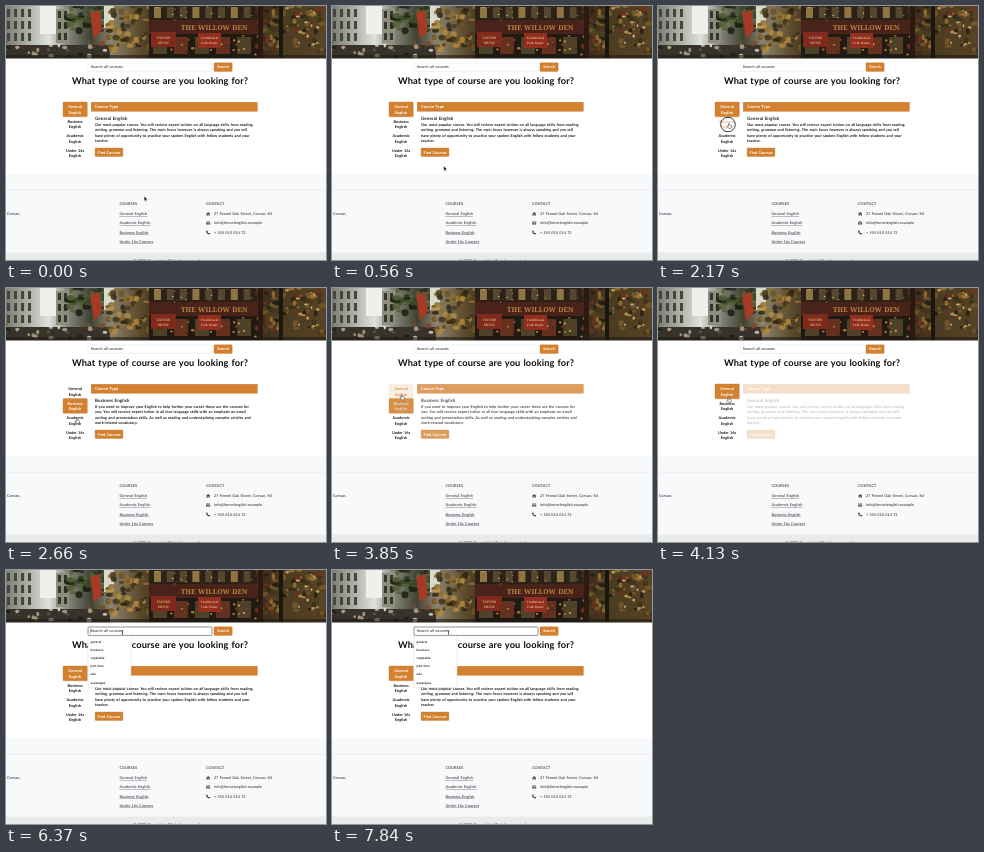
Animation of 320x254 px, one loop 8 s. Source, as an HTML page:

```html
<!DOCTYPE html>
<html lang="en">
<head>
<meta charset="utf-8">
<title>Course finder</title>
<style>
  html, body { margin: 0; width: 100%; height: 100%; overflow: hidden; background: #fff; }
  svg { display: block; width: 100vw; height: 100vh; }
  text {
    font-family: Lato, "Open Sans", sans-serif; font-weight: 700;
    letter-spacing: .013em; word-spacing: .07em; text-rendering: geometricPrecision;
  }
  .menu text { font-family: Roboto, Inter, sans-serif; font-weight: 500; }
  .sign text { font-family: "Noto Serif", serif; font-weight: 600; }
</style>
</head>
<body>
<svg id="stage" viewBox="0 0 320 254">
  <defs>
    <linearGradient id="street">
      <stop offset="0" stop-color="#75766a"/>
      <stop offset=".07" stop-color="#a9aba2"/>
      <stop offset=".14" stop-color="#dfe2dc"/>
      <stop offset=".2" stop-color="#85867a"/>
      <stop offset=".27" stop-color="#3f4231"/>
      <stop offset=".33" stop-color="#8c8370"/>
      <stop offset=".42" stop-color="#5b4a2b"/>
      <stop offset=".5" stop-color="#33271b"/>
      <stop offset=".76" stop-color="#382319"/>
      <stop offset=".86" stop-color="#4a3b21"/>
      <stop offset="1" stop-color="#594426"/>
    </linearGradient>
    <filter id="soft"><feGaussianBlur stdDeviation=".55"/></filter>
    <clipPath id="photoClip"><rect width="320" height="52.5"/></clipPath>
  </defs>
</svg>
<script>
const LOOP = 8000, STEP = 70;
const ORANGE = '#d4812f', BLACK = [20, 20, 20], AMBER = [212, 129, 47], WHITE = [255, 255, 255];
const stage = document.getElementById('stage');

function add(parent, tag, attrs = {}, content) {
  const node = document.createElementNS('http://www.w3.org/2000/svg', tag);
  for (const key in attrs) node.setAttribute(key, attrs[key]);
  if (content) node.textContent = content;
  return parent.appendChild(node);
}
const group = (parent, attrs) => add(parent, 'g', attrs);
const rect = (parent, x, y, width, height, fill, more) =>
  add(parent, 'rect', { x, y, width, height, fill, ...more });
const block = (parent, x, y, width, height, more) =>
  rect(parent, x, y, width, height, ORANGE, { stroke: '#bd7330', 'stroke-width': .35, ...more });
const label = (parent, x, y, size, content, fill = '#161616', more) =>
  add(parent, 'text', { x, y, 'font-size': size, fill, ...more }, content);
const middle = { 'text-anchor': 'middle' };

// Street photograph in broad tones
let seed = 11;
const random = () => (seed = (seed * 16807) % 2147483647) / 2147483647;
function scatter(parent, count, x, y, w, h, size, colours) {
  for (let i = 0; i < count; i++) {
    add(parent, 'ellipse', {
      cx: x + random() * w, cy: y + random() * h,
      rx: size * (.5 + random()), ry: size * (.4 + random() * .8),
      fill: colours[Math.floor(random() * colours.length)], opacity: .85
    });
  }
}
function drawPhoto() {
  const outer = group(stage, { 'clip-path': 'url(#photoClip)' });
  const photo = group(outer, { filter: 'url(#soft)' });
  rect(photo, -3, -3, 326, 59, 'url(#street)');

  // Left side: pale facades, sky and a tree
  for (let i = 0; i < 12; i++) rect(photo, 1 + i % 4 * 7, 3 + Math.floor(i / 4) * 12, 3, 8, '#44463d');
  rect(photo, 34, -2, 16, 30, '#eef0ec');
  rect(photo, 50, 3, 13, 34, '#8f8d7e');
  for (let i = 0; i < 6; i++) rect(photo, 52 + i % 2 * 6, 5 + Math.floor(i / 2) * 11, 3, 7, '#35372d');
  rect(photo, 0, 39, 104, 15, '#37332a');
  scatter(photo, 26, 0, 36, 104, 15, 2, ['#1b1b16', '#5f5747', '#b3a68c', '#7c4a2c', '#dcd7c8']);
  scatter(photo, 44, 60, -1, 40, 26, 3, ['#252e1b', '#3d4928', '#566037', '#191f13']);
  add(photo, 'path', { d: 'M84 7l9-3 3 20-8 9z', fill: '#a53a25' });
  rect(photo, 98, 0, 10, 22, '#d9d9cc');
  scatter(photo, 70, 101, 0, 42, 44, 2.8, ['#2e2715', '#6b5425', '#8f702f', '#47391c', '#b18a42']);

  // Pub front
  rect(photo, 143, 0, 108, 14, '#2b2117');
  for (let i = 0; i < 8; i++) rect(photo, 148 + i * 12.8, 1, 7, 11, i % 3 ? '#55472f' : '#8f7544');
  rect(photo, 143, 14, 110, 14, '#49231a');
  rect(photo, 143, 28, 110, 26, '#211a13');
  for (let i = 0; i < 5; i++) rect(photo, 147 + i * 21, 31, 14, 17, i % 2 ? '#65311f' : '#4d4128');
  scatter(photo, 34, 146, 29, 104, 20, 1.2, ['#c8853a', '#8b3821', '#d9a555', '#2a2219']);
  rect(photo, 145, 26, 25, 15, '#7f2a1c');
  rect(photo, 192, 27, 23, 15, '#932f20');
  scatter(photo, 22, 145, 0, 106, 14, .7, ['#e9bf70', '#c49048']);

  // Right side: trunk and golden leaves
  scatter(photo, 95, 250, -1, 70, 46, 2.9, ['#251e12', '#4c4020', '#75592a', '#9a7434', '#38331b', '#6d3320']);
  rect(photo, 252, 0, 5, 54, '#2c1a12');
  rect(photo, 273, 0, 4, 54, '#1a1710');
  scatter(photo, 20, 280, 2, 40, 42, 1.4, ['#c6a25c', '#a05c30', '#d8c48f']);
  rect(photo, 0, 49, 320, 5, '#211b14', { opacity: .6 });

  const sign = group(outer, { class: 'sign' });
  label(sign, 175, 24.3, 6.8, 'THE WILLOW DEN', '#bd8640');
  label(sign, 157.5, 32.5, 3.3, 'TAVERN', '#d9ad76', middle);
  label(sign, 157.5, 37.5, 3.3, 'MUSIC', '#d9ad76', middle);
  label(sign, 203.5, 33, 3, 'Traditional', '#dfb27c', middle);
  label(sign, 203.5, 37.5, 3, 'Folk Music', '#dfb27c', middle);
}
drawPhoto();

// Page
const field = rect(stage, 82, 57, 124, 8.4, '#fff', { rx: .8 });
label(stage, 84.7, 62.2, 3.9, 'Search all courses', '#555');
block(stage, 208, 56.8, 18.2, 8.6, { rx: .8 });
label(stage, 217.2, 62.3, 3.8, 'Search', '#fff', middle);
label(stage, 66, 77.5, 9.22, 'What type of course are you looking for?', '#0c0c0c');

const tabs = ['General', 'Business', 'Academic', 'Under 16s'].map((name, i) => {
  const y = 96 + i * 14.5;
  return {
    box: block(stage, 57, y, 24.3, 14.8, { rx: .8, opacity: 0 }),
    lines: [name, 'English'].map((word, n) => label(stage, 69.1, y + 6.1 + n * 5.4, 3.85, word, '#161616', middle))
  };
});

function coursePanel(title, lines) {
  const panel = group(stage);
  block(panel, 85.2, 96.2, 166.2, 9.1);
  label(panel, 89, 102.1, 4.1, 'Course Type', '#fff');
  label(panel, 89, 113.6, 4.55, title, '#222');
  lines.forEach((line, i) => label(panel, 89, 120 + i * 5.33, 3.75, line));
  block(panel, 89.1, 142, 27.8, 8.5, { rx: .8 });
  label(panel, 103, 147.5, 3.85, 'Find Courses', '#fff', middle);
  return panel;
}

// Footer
rect(stage, 0, 168, 320, 78.5, '#f8f9fb');
rect(stage, 0, 183.8, 320, .6, '#dfe1e6');
rect(stage, 0, 246.5, 320, 8, '#e9ebeb');
label(stage, 127, 256, 3.85, '© 2020 Copyright: All rights reserved', '#555');
label(stage, 1, 209.4, 3.85, 'Corvan,', '#55555a');
label(stage, 113.5, 198.9, 3.85, 'COURSES', '#55555a');
label(stage, 200, 198.9, 3.85, 'CONTACT', '#55555a');
['General English', 'Academic English', 'Business English', 'Under 16s Courses'].forEach((name, i) =>
  label(stage, 113.5, 209.4 + i * 9.05, 3.85, name, '#5c5c61', { 'text-decoration': 'underline' }));
['27 Fennel Oak Street, Corvan, K4', 'info@fennelenglish.example', '+ 555 010 014 72'].forEach((line, i) =>
  label(stage, 208, 209.4 + i * 9.05, 3.75, line, '#55555a'));
[
  'M200 208l2.2-2 2.2 2h-.6v1.8h-1.1v-1.2h-1v1.2h-1.1v-1.8z',
  'M200 215.5h4.2l-2.1 1.5zM200 216.2l2.1 1.5 2.1-1.5v2.4h-4.2z',
  'M201 224.3l.9.9-.5.8 1.2 1.2.8-.5.9.9-.9 1c-1.8-.2-3.3-1.7-3.4-3.4z'
].forEach(d => add(stage, 'path', { d, fill: '#4c4c50' }));

const general = coursePanel('General English', [
  'Our most popular course. You will recieve expert tuition on all language skills from reading,',
  'writing, grammar and listening. The main focus however is always speaking and you will',
  'have plenty of opportunity to practise your spoken English with fellow students and your',
  'teacher.'
]);
const business = coursePanel('Business English', [
  'If you need to improve your English to help further your career these are the courses for',
  'you. You will receive expert tution in all four language skills with an emphasis on email',
  'writing and presentation skills. As well as reading and understadning complex articles and',
  'work-related vocabulary.'
]);

// Search suggestions
const menu = group(stage, { class: 'menu' });
rect(menu, 82, 66, 43, 51.3, '#fff', { stroke: '#d2d2d2', 'stroke-width': .4 });
['general', 'business', 'vegetable', 'part-time', 'edu', 'asparagus'].forEach((word, i) =>
  label(menu, 84.6, 72.6 + i * 8.2, 3.1, word, '#222'));
const caret = rect(stage, 84.1, 58.9, .4, 4.5, '#222');

// Pointer
const ring = add(stage, 'circle', { r: 7.3, fill: '#fff', 'fill-opacity': .4, stroke: '#3a3a3a', 'stroke-width': 1 });
const pointer = group(stage);
const outline = { fill: '#fff', stroke: '#222', 'stroke-width': .45, 'stroke-linejoin': 'round' };
const shapes = {
  arrow: add(pointer, 'path', { ...outline, fill: '#111', stroke: '#fff', 'stroke-width': .35, d: 'M-.8-.8v4.7l1.1-1 .8 1.7.8-.4-.8-1.6h1.5z' }),
  hand: add(pointer, 'path', { ...outline, d: 'M-.6 0q.5-.7.9 0v1.6l1.6.3q.7.2.6.9l-.4 2.1h-2.5l-1.5-2q0-.7.7-.4l.6.5z' }),
  beam: add(pointer, 'path', { ...outline, fill: 'none', d: 'M-.8-2.2q.8 0 .8.6v3.2q0 .6-.8.6M.8-2.2q-.8 0-.8.6v3.2q0 .6.8.6' })
};
const path = [
  [0, 139, 191], [70, 138, 190], [840, 98, 144], [1260, 71, 117.5], [2380, 71, 117.5],
  [2660, 71, 130.5], [3080, 71, 130.5], [3640, 70, 107], [4060, 70, 107], [4410, 74, 119],
  [5110, 74, 119], [5180, 87, 100], [5320, 97, 84], [5460, 111, 68], [5600, 115.5, 63],
  [5740, 116.5, 62.5], [LOOP, 116.5, 62.5]
];

const clamp = v => Math.max(0, Math.min(1, v));
const ramp = (t, from, to) => clamp((t - from) / (to - from));
const within = (t, from, to) => t >= from && t < to;
const mix = (a, b, k) => `rgb(${a.map((v, i) => Math.round(v + (b[i] - v) * k))})`;
const show = (node, on) => node.setAttribute('visibility', on ? 'visible' : 'hidden');

function pointerAt(t) {
  const i = path.findIndex(p => p[0] > t);
  const [t0, x0, y0] = path[i - 1], [t1, x1, y1] = path[i];
  const k = ramp(t, t0, t1);
  return [x0 + (x1 - x0) * k, y0 + (y1 - y0) * k];
}
function paintTab(tab, level, hovered) {
  tab.box.setAttribute('opacity', level);
  tab.lines.forEach(line => line.setAttribute('fill', mix(hovered ? AMBER : BLACK, WHITE, level)));
}
function render(t) {
  const chosen = ramp(t, 2200, 2450) - ramp(t, 3820, 4060);
  paintTab(tabs[0], 1 - chosen, within(t, 3500, 4060));
  paintTab(tabs[1], chosen, within(t, 1190, 2450));

  const fade = t < 3000
    ? 1 - ramp(t, 2200, 2350) + ramp(t, 2350, 2550)
    : 1 - ramp(t, 3790, 4060) + ramp(t, 4060, 4340);
  const onBusiness = within(t, 2350, 4060);
  show(general, !onBusiness);
  show(business, onBusiness);
  (onBusiness ? business : general).setAttribute('opacity', fade);

  const focused = t >= 6090;
  field.setAttribute('stroke', focused ? '#777' : '#dedede');
  field.setAttribute('stroke-width', focused ? .8 : .4);
  show(menu, t >= 6160);
  show(caret, focused && Math.floor((t - 6050) / 530) % 2 === 0);

  const [x, y] = pointerAt(t);
  pointer.setAttribute('transform', `translate(${x} ${y})`);
  const kind = t >= 5530 ? 'beam' : within(t, 1120, 5110) ? 'hand' : 'arrow';
  for (const name in shapes) show(shapes[name], name === kind);
  ring.setAttribute('cx', x - 1);
  ring.setAttribute('cy', y + 1);
  show(ring, within(t, 2100, 2310) || within(t, 3640, 3780));
}

const start = performance.now();
function tick() {
  const t = (performance.now() - start) % LOOP;
  render(Math.floor(t / STEP) * STEP);
  requestAnimationFrame(tick);
}
tick();
</script>
</body>
</html>
```
